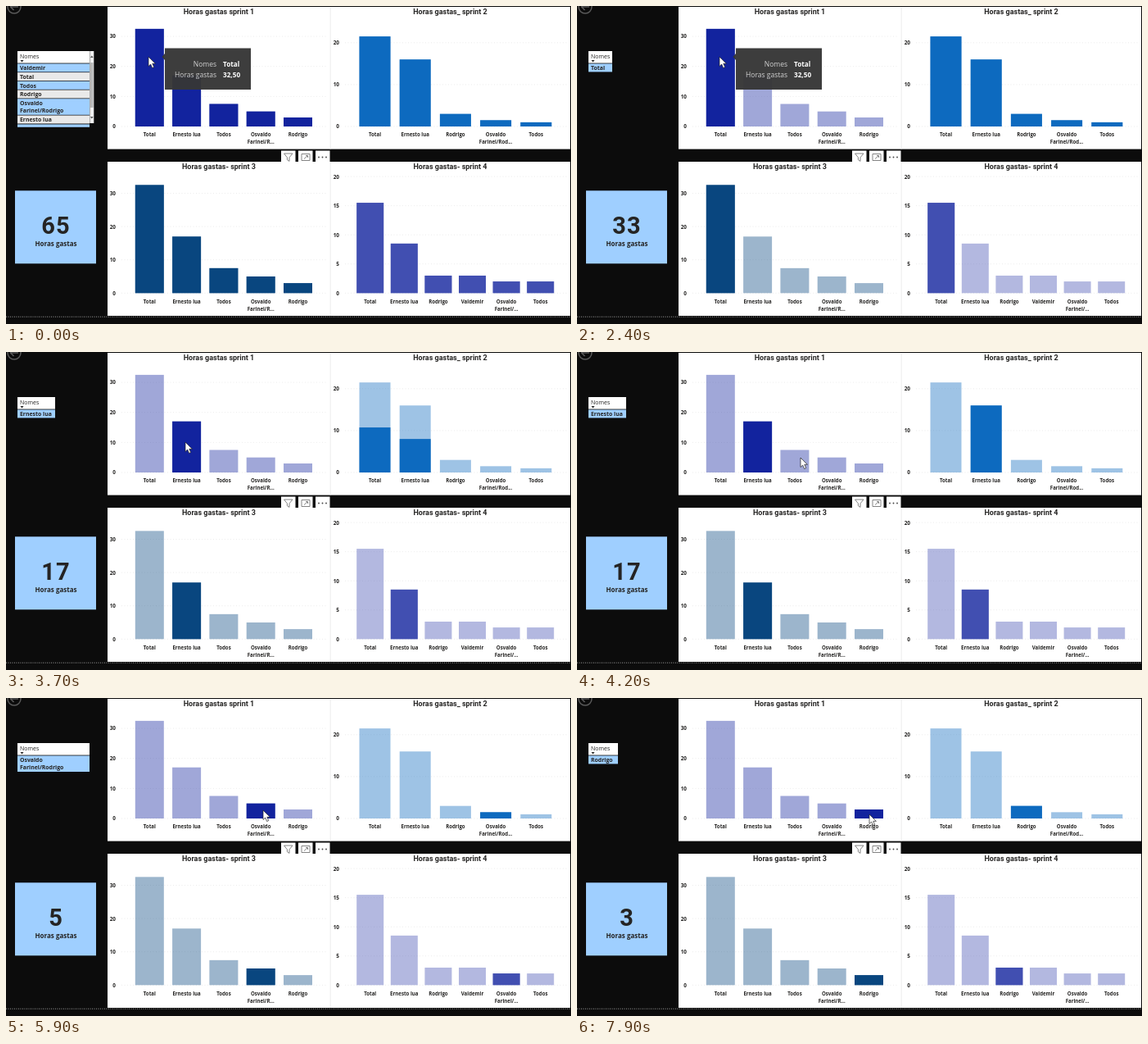
An HTML page that plays this animation: 690x388 px, repeating every 8000 ms.

```html
<!DOCTYPE html>
<html lang="pt">
<head>
<meta charset="utf-8">
<title>Horas gastas</title>
<style>
html, body { margin: 0; width: 100%; height: 100%; overflow: hidden; background: #0c0c0c; }
svg { display: block; width: 100vw; height: 100vh; }
text { font-family: "Open Sans", "Noto Sans", sans-serif; fill: #252423; }
.tick { font-size: 6.4px; font-weight: 700; }
.name { font-size: 6.1px; font-weight: 700; }
.name, .title, .big, .sum { text-anchor: middle; }
.tick, .key { text-anchor: end; }
.title { font: 700 9px Roboto, sans-serif; }
.big { font: 700 29px Roboto, sans-serif; letter-spacing: 1px; }
.sum { font-size: 8px; font-weight: 700; }
.head { font-size: 7px; }
.row { font-size: 6.9px; font-weight: 700; }
.key { font-size: 8.5px; fill: #d0d0d0; }
.val { font-size: 8.2px; font-weight: 700; fill: #fff; }
.grid { stroke: #e4e4e4; stroke-width: .7; stroke-dasharray: 1 2.5; }
.icon { fill: none; stroke: #777; stroke-width: .9; }
</style>
</head>
<body>
<svg id="stage" viewBox="0 0 690 388" preserveAspectRatio="none"></svg>
<script>
const LOOP = 8000, STEP = 100, FADE = 180;
const BLUE = '#9fcfff', GREY = '#e9e9e9';
const stage = document.getElementById('stage');

function add(tag, attrs, parent = stage, text) {
  const el = document.createElementNS('http://www.w3.org/2000/svg', tag);
  for (const k in attrs) el.setAttribute(k, attrs[k]);
  if (text !== undefined) el.textContent = text;
  parent.appendChild(el);
  return el;
}
const box = (x, y, width, height, fill, parent) => add('rect', { x, y, width, height, fill }, parent);
const label = (cls, x, y, text, parent) => add('text', { class: cls, x, y }, parent, text);
const path = (d, attrs, parent) => add('path', { d, ...attrs }, parent);

const people = {
  total: ['Total'],
  ernesto: ['Ernesto lua'],
  todos: ['Todos'],
  osvaldo: ['Osvaldo', 'Farinel/Rodrigo'],
  rodrigo: ['Rodrigo'],
  valdemir: ['Valdemir']
};

const charts = [
  { title: 'Horas gastas sprint 1', cx: 260, ty: 9.8, zero: 147, unit: 3.665, ticks: [0, 10, 20, 30],
    tickX: 134, grid: [141, 392], x: 157.8, step: 45.3, w: 35, color: '#12239e', cut: 'Farinel/R...',
    data: { total: 32.5, ernesto: 17, todos: 7.5, osvaldo: 5, rodrigo: 3 }, lag: 0 },
  { title: 'Horas gastas_ sprint 2', cx: 542.5, ty: 9.8, zero: 147, unit: 5.11, ticks: [0, 10, 20],
    tickX: 407, grid: [414, 686], x: 431.5, step: 49.2, w: 38, color: '#0d6abf', cut: 'Farinel/Rod...',
    data: { total: 21.5, ernesto: 16, rodrigo: 3, osvaldo: 1.5, todos: 1 }, lag: 2 },
  { title: 'Horas gastas- sprint 3', cx: 260, ty: 199.2, zero: 350.3, unit: 4.06, ticks: [0, 10, 20, 30],
    tickX: 134, grid: [141, 392], x: 157.8, step: 45.3, w: 35, color: '#09467f', cut: 'Farinel/R...',
    data: { total: 32.5, ernesto: 17, todos: 7.5, osvaldo: 5, rodrigo: 3 }, lag: 1 },
  { title: 'Horas gastas- sprint 4', cx: 542.5, ty: 199.2, zero: 350.3, unit: 7.11, ticks: [0, 5, 10, 15, 20],
    tickX: 407, grid: [414, 686], x: 428.2, step: 41.6, w: 33, color: '#414fb1', cut: 'Farinel/...',
    data: { total: 15.5, ernesto: 8.5, rodrigo: 3, valdemir: 3, osvaldo: 2, todos: 2 }, lag: 1 }
];

// at: click, and when the linked charts begin to follow
const picks = [
  { who: 'total', sum: 33, at: [1700, 2150, 2420], width: 29 },
  { who: 'ernesto', sum: 17, at: [3500, 3493, 3610], width: 46 },
  { who: 'todos', sum: 8, at: [4700, 4774, 4891], width: 29 },
  { who: 'osvaldo', sum: 5, at: [5600, 5600, 5700], width: 88 },
  { who: 'rodrigo', sum: 3, at: [6600, 6660, 6780], width: 36 }
];

// from, to, then the start and end points of the pointer
const moves = [
  [2700, 3300, 174, 62, 219, 110],
  [3800, 4200, 219, 110, 273, 129],
  [5000, 5300, 273, 129, 314, 137],
  [5950, 6300, 314, 137, 354, 142],
  [7800, 7900, 354, 142, 357, 142]
];

const clamp = v => Math.max(0, Math.min(1, v));
const ease = p => p * p * (3 - 2 * p);

function drawChart(c) {
  label('title', c.cx, c.ty, c.title);
  for (const v of c.ticks) {
    const y = c.zero - v * c.unit;
    add('line', { class: 'grid', x1: c.grid[0], x2: c.grid[1], y1: y, y2: y });
    label('tick', c.tickX, y + 2.4, v);
  }
  c.bars = Object.entries(c.data).map(([who, v], i) => {
    const x = c.x + i * c.step, h = v * c.unit, mid = x + c.w / 2;
    box(x, c.zero - h, c.w, h, c.color).setAttribute('opacity', .4);
    const lit = box(x, c.zero - h, c.w, h, c.color);
    label('name', mid, c.zero + 12.4, people[who][0]);
    if (who === 'osvaldo') label('name', mid, c.zero + 21.4, c.cut);
    return { who, h, lit };
  });
}

function drawHead(g, width) {
  box(14, 55, width, 14.6, '#fff', g);
  label('head', 17, 64, 'Nomes', g);
  path('M17.5 66h4l-2 2.4z', { fill: '#252423' }, g);
}

function drawRow(g, who, y, width, fill) {
  const lines = people[who];
  box(14, y, width, lines.length * 9.6 + .4, fill, g);
  lines.forEach((s, i) => label('row', 17, y + 7.7 + i * 9.1, s, g));
}

function drawFullList() {
  const g = add('g', {});
  drawHead(g, 88);
  let y = 70.4;
  ['valdemir', 'total', 'todos', 'rodrigo', 'osvaldo', 'ernesto'].forEach((who, i) => {
    drawRow(g, who, y, 88, i % 2 ? GREY : BLUE);
    y += people[who].length * 9.6 + 1.1;
  });
  box(14, 144.4, 88, 3.4, BLUE, g);
  box(102.3, 55, 5, 88, '#f0f0f0', g);
  box(103, 69, 3.6, 55, '#b9b9b9', g);
  path('M103 63l1.8-2.4 1.8 2.4zM103 135l1.8 2.4 1.8-2.4z', { fill: '#555' }, g);
  return g;
}

function drawPickList(p) {
  const g = add('g', {});
  drawHead(g, p.width);
  drawRow(g, p.who, 70.4, p.width, BLUE);
  return g;
}

function drawTip() {
  const g = add('g', { opacity: .96 });
  path('M194 51.5h105v50.5h-105v-36l-3.5-4 3.5-4z', { fill: '#363636' }, g);
  [['Nomes', 'Total', 74], ['Horas gastas', '32,50', 87]].forEach(([k, v, y]) => {
    label('key', 257, y, k, g);
    label('val', 265, y, v, g);
  });
  return g;
}

function drawPanel(y, h) {
  box(124, y, 565, h, '#fff');
  box(395.7, y, .8, h, '#e6e6e6');
}

box(0, 0, 690, 388, '#0c0c0c');
drawPanel(1, 173.6);
drawPanel(190, 188);
path('M0 379.2H690', { stroke: '#9a9a9a', 'stroke-width': 1, 'stroke-dasharray': '1 1.5' });

add('circle', { cx: 10, cy: 1, r: 8, fill: 'none', stroke: '#5a5a5a', 'stroke-width': 1.5 });
path('M15 1H5.5M9.5-3l-4 4 4 4', { fill: 'none', stroke: '#5a5a5a', 'stroke-width': 1.5 });

[336, 357, 378].forEach(x => box(x, 176.5, 17.5, 14.5, '#fff'));
path('M339.5 180h10.5l-4 4.8v4.6l-2.6-1.8v-2.8z', { class: 'icon' });
path('M361 180.5h10v8h-10zM364 186.5l4.5-4M366 182.5h2.5v2.5', { class: 'icon' });
[382, 386.5, 391].forEach(cx => add('circle', { cx, cy: 184.5, r: .9, fill: '#444' }));

charts.forEach(drawChart);

box(11, 225.3, 99, 89, BLUE);
const sum = label('big', 61, 278, '65');
label('sum', 61, 293, 'Horas gastas');

const lists = [drawFullList(), ...picks.map(drawPickList)];
const tip = drawTip();
const cursor = path('M0 0v11.5l2.7-2.4 1.9 4.4 2.1-.9-1.9-4.3h3.6z',
  { fill: '#fff', stroke: '#222', 'stroke-width': .7 });

// share of a bar that stays lit at time t
function litShare(who, lag, t) {
  let share = 1;
  for (const p of picks) {
    const k = lag ? clamp((t - p.at[lag]) / FADE) : +(t >= p.at[0]);
    share += ((p.who === who ? 1 : 0) - share) * k;
  }
  return share;
}

function render(t) {
  for (const c of charts) {
    for (const b of c.bars) {
      const h = b.h * litShare(b.who, c.lag, t);
      b.lit.setAttribute('y', c.zero - h);
      b.lit.setAttribute('height', h);
    }
  }
  const n = picks.filter(p => t >= p.at[0] + 100).length;
  sum.textContent = n ? picks[n - 1].sum : 65;
  lists.forEach((g, i) => g.setAttribute('display', i === n ? 'inline' : 'none'));
  tip.setAttribute('display', t < 2700 ? 'inline' : 'none');

  let x = 174, y = 62;
  for (const [from, to, x0, y0, x1, y1] of moves) {
    if (t < from) break;
    const k = ease(clamp((t - from) / (to - from)));
    x = x0 + (x1 - x0) * k;
    y = y0 + (y1 - y0) * k;
  }
  cursor.setAttribute('transform', `translate(${x} ${y})`);
}

const start = performance.now();
function tick() {
  const t = (performance.now() - start + 5) % LOOP;
  render(Math.floor(t / STEP) * STEP);
  requestAnimationFrame(tick);
}
tick();
</script>
</body>
</html>
```
